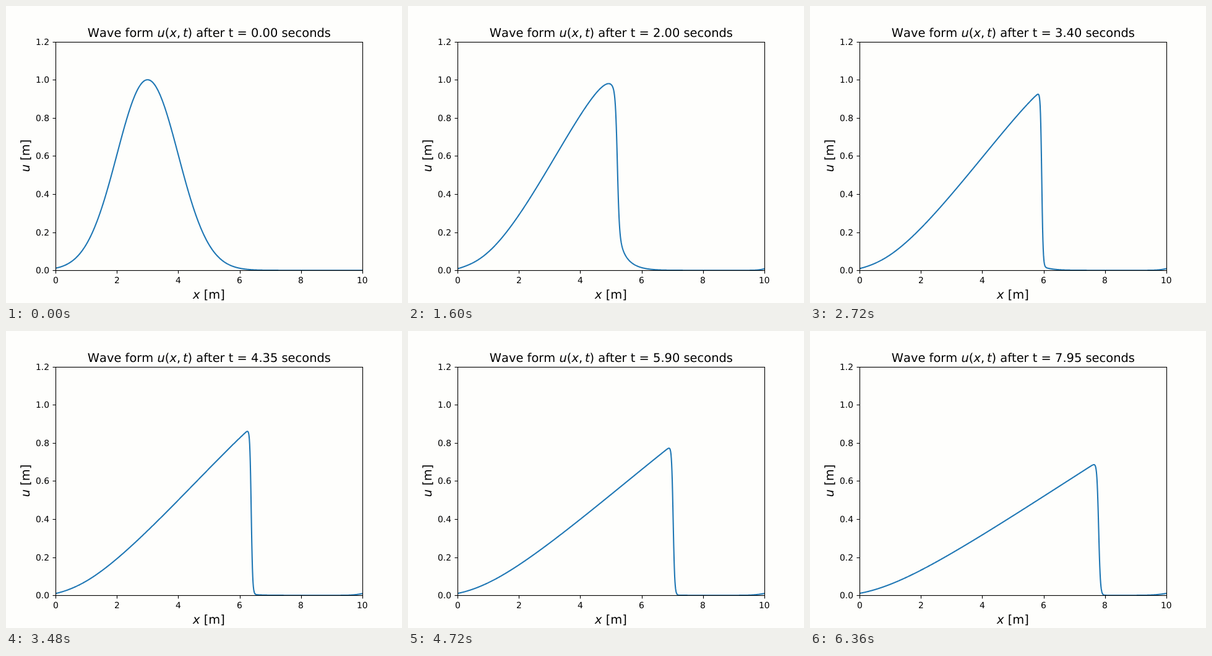
Recreate the animation shown at these times as an HTML page. Size 640 px wide and 480 px high, loop 6.4 s.

```html
<!DOCTYPE html>
<html lang="en">
<head>
<meta charset="utf-8">
<title>Wave form</title>
<style>
  html, body { margin: 0; width: 100%; height: 100%; overflow: hidden; background: #fefefc; }
  svg { display: block; width: 640px; height: 480px; }
  text { font-family: "DejaVu Sans", sans-serif; font-size: 13.89px; font-kerning: none; text-rendering: geometricPrecision; }
  .big { font-size: 19.44px; text-anchor: middle; }
  .math { font-style: italic; }
</style>
</head>
<body>
<svg viewBox="0 0 640 480">
  <defs><clipPath id="plot"><rect x="80" y="57.6" width="496" height="369.6"/></clipPath></defs>
  <path id="curve" clip-path="url(#plot)" fill="none" stroke="#1f77b4" stroke-width="2.08" stroke-linejoin="round"/>
  <g id="axes" stroke="#000" stroke-width="1.11" fill="none">
    <rect x="80.5" y="58.5" width="496" height="369"/>
  </g>
  <g id="labels"></g>
  <text class="big" x="328.4" y="50">Wave form <tspan class="math">u</tspan>(<tspan class="math">x</tspan>,<tspan class="math" dx="3.8">t</tspan>) after t = <tspan id="clock">0.00</tspan> seconds</text>
  <text class="big" x="328" y="473"><tspan class="math">x</tspan> [m]</text>
  <text class="big" transform="translate(38 242) rotate(-90)"><tspan class="math">u</tspan> [m]</text>
</svg>
<script>
const FRAMES = 160, FRAME_MS = 40, CLOCK_STEP = 0.05;
const N = 1000, LENGTH = 10, DX = LENGTH / N, VISCOSITY = 0.01;
// 320 samples span 0..8 s inclusive; every second one is shown.
const SUBSTEPS = 10, DT = 2 * 8 / 319 / SUBSTEPS;
const DIGIT_WIDTH = 8.84;

const byId = id => document.getElementById(id);
const px = x => 80 + 49.6 * x;
const py = u => 427.2 - 308 * u;
const snap = v => Math.floor(v + 0.5) + 0.5;

function add(parent, tag, attrs, text = "") {
  const el = document.createElementNS("http://www.w3.org/2000/svg", tag);
  for (const key in attrs) el.setAttribute(key, attrs[key]);
  el.textContent = text;
  parent.appendChild(el);
}

function drawTicks() {
  const axes = byId("axes"), labels = byId("labels");
  for (let x = 0; x <= 10; x += 2) {
    const label = String(x);
    add(axes, "path", { d: `M${snap(px(x))} 427.5V432.5` });
    add(labels, "text", { x: Math.round(px(x) - label.length * DIGIT_WIDTH / 2), y: 448 }, label);
  }
  for (let i = 0; i <= 6; i++) {
    const y = py(i / 5);
    add(axes, "path", { d: `M80.5 ${snap(y)}H75.5` });
    add(labels, "text", { x: 48, y: Math.round(y + 5) }, (i / 5).toFixed(1));
  }
}

// Viscous Burgers equation on a periodic domain: u_t = -(u²/2)_x + ν u_xx
function slope(u, out) {
  const flux = 1 / (4 * DX), diffusion = VISCOSITY / (DX * DX);
  for (let i = 0; i < N; i++) {
    const left = u[i ? i - 1 : N - 1], right = u[i < N - 1 ? i + 1 : 0];
    out[i] = (left * left - right * right) * flux + (left - 2 * u[i] + right) * diffusion;
  }
}

const stages = Array.from({ length: 4 }, () => new Float64Array(N));
const trial = new Float64Array(N);

function stepRK4(u) {
  const [a, b, c, d] = stages;
  const advance = (k, h) => {
    for (let i = 0; i < N; i++) trial[i] = u[i] + h * k[i];
  };
  slope(u, a);
  advance(a, DT / 2);
  slope(trial, b);
  advance(b, DT / 2);
  slope(trial, c);
  advance(c, DT);
  slope(trial, d);
  for (let i = 0; i < N; i++) u[i] += DT / 6 * (a[i] + 2 * b[i] + 2 * c[i] + d[i]);
}

const gridX = i => LENGTH * i / (N - 1);

function solve() {
  const u = Float64Array.from({ length: N }, (_, i) => Math.exp(-((gridX(i) - 3) ** 2) / 2));
  const waves = [];
  for (let f = 0; f < FRAMES; f++) {
    waves.push(u.slice());
    for (let s = 0; s < SUBSTEPS; s++) stepRK4(u);
  }
  return waves;
}

const waves = solve();
let shown = -1;

function render(ms) {
  const frame = Math.floor(ms / FRAME_MS) % FRAMES;
  if (frame === shown) return;
  shown = frame;
  const points = Array.from(waves[frame], (u, i) => px(gridX(i)).toFixed(2) + " " + py(u).toFixed(2));
  byId("curve").setAttribute("d", "M" + points.join("L"));
  byId("clock").textContent = (frame * CLOCK_STEP).toFixed(2);
}

drawTicks();
render(0);
let start;
requestAnimationFrame(function tick(now) {
  start ??= now;
  render(now - start);
  requestAnimationFrame(tick);
});
</script>
</body>
</html>
```
